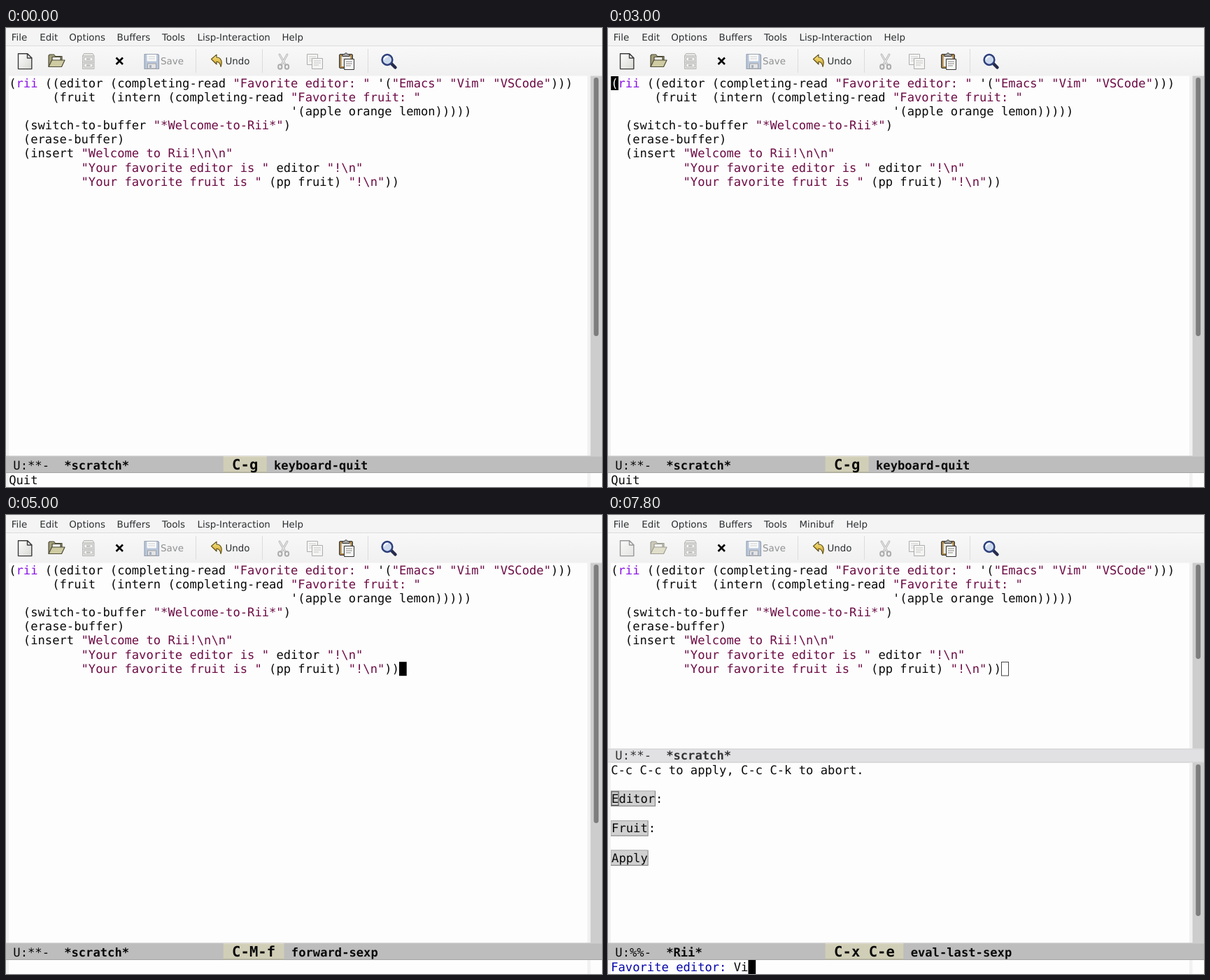
Write an HTML page that moves like this. It is 852 px wide and 657 px high and loops after 8000 ms.

```html
<!DOCTYPE html>
<html lang="en">
<head>
<meta charset="utf-8">
<title>Editor session</title>
<style>
  html, body { margin: 0; width: 100%; height: 100%; overflow: hidden; background: #fdfdfd; }
  svg { display: block; width: 852px; height: 657px; }
  text { white-space: pre; text-rendering: geometricPrecision; font: 17.16px "DejaVu Sans Mono", monospace; fill: #0a0a0a; }
  .ui { font: 13.43px "DejaVu Sans", sans-serif; fill: #2c2f31; }
  .bold { font-weight: bold; }
  .key { font-size: 20.6px; font-weight: bold; }
  .string { fill: #6d0c45; }
  .keyword { fill: #8a14e6; }
  .prompt { fill: #0606ac; }
  .soft { fill: #333; }
  .off { opacity: .5; }
</style>
</head>
<body>
<svg id="stage" viewBox="0 0 852 657" xml:space="preserve">
  <defs>
    <linearGradient id="bar" x2="0" y2="1"><stop stop-color="#f8f8f8"/><stop offset="1" stop-color="#f0f0f0"/></linearGradient>
    <linearGradient id="paper" x2="1" y2="1"><stop stop-color="#fff"/><stop offset="1" stop-color="#d6d6d2"/></linearGradient>
    <linearGradient id="gold" x2="0" y2="1"><stop stop-color="#fbe98a"/><stop offset="1" stop-color="#c99a1c"/></linearGradient>

    <g id="new" stroke="#3c3c3c" stroke-width="1.4" stroke-linejoin="round">
      <path d="M17.5 36.7H30.5L36.8 43V58.6H17.5Z" fill="url(#paper)"/>
      <path d="M30.5 36.7V43H36.8Z" fill="#fff"/>
    </g>
    <g id="open" stroke="#4b4a36" stroke-width="1.2" stroke-linejoin="round">
      <path d="M61 55.5V39.5L62.5 38H68.5L70.5 40.5H80V46" fill="#a5a17c"/>
      <path d="M66 41.5H78V49H66Z" fill="#f2f2ee"/>
      <path d="M61 55.5L65.5 46H84L79.5 55.5Z" fill="#cfcba2"/>
    </g>
    <g id="cabinet" stroke="#777" fill="#d9d9d2" stroke-linejoin="round">
      <path d="M109.5 40L111.5 36.5H124L126 40V58.5H109.5Z"/>
      <path d="M109.5 40H126M109.5 49H126M111.5 42H124V47H111.5ZM111.5 51H124V56H111.5Z" fill="#f2f2ec"/>
      <path d="M115 44.5H120.5M115 53.5H120.5" stroke-width="1.8"/>
    </g>
    <g id="save" stroke-linejoin="round">
      <path d="M198 37.5H217L218.5 39V58.5H198Z" fill="#7f9ac2" stroke="#3c5070" stroke-width="1.2"/>
      <path d="M201.500 38H215V47.500H201.500Z" fill="#fff"/>
      <path d="M203.500 41H213M203.500 44H213" stroke="#aaa"/>
      <path d="M202.500 51H214.500V58H202.500Z" fill="#d6d6d6" stroke="#555"/>
      <path d="M205 53H208V57H205Z" fill="#556f94"/>
    </g>
    <path id="undo" d="M293.5 44.500L301 38.200V42C307 42 310 47.500 307 55.500C306.200 50.800 304.500 48.300 301 48.300V52Z" fill="url(#gold)" stroke="#5c4b14" stroke-width="1.1" stroke-linejoin="round"/>
    <g id="cut" fill="none" stroke="#666" stroke-linecap="round">
      <path d="M391 38L399.500 53M402 38L393.500 53" stroke="#6d6d6d" stroke-width="2.8"/>
      <path d="M391 38L399.500 53M402 38L393.500 53" stroke="#e6e6e6" stroke-width="1.2"/>
      <ellipse cx="391.8" cy="55.500" rx="2.700" ry="3.300" stroke-width="2"/>
      <ellipse cx="401.500" cy="55.500" rx="2.700" ry="3.300" stroke-width="2"/>
    </g>
    <g id="copy" stroke="#666" fill="#f6f6f4">
      <path d="M430.500 37.500H445.500V52.500H430.500Z"/>
      <path d="M433 41H443M433 44H443M433 47H443" stroke="#aaa"/>
      <path d="M437.500 43.500H452.500V58.500H448L437.500 58.500Z"/>
      <path d="M440 47H450M440 50H450M440 53H447" stroke="#999"/>
    </g>
    <g id="paste" stroke="#333" stroke-linejoin="round">
      <rect x="476.500" y="37.500" width="19" height="20" rx="1.500" fill="#a58247"/>
      <path d="M479.500 40.500H492.500V55H479.500Z" fill="#e9e9e4" stroke="none"/>
      <path d="M481 40.500V37.500H484C484 35.300 488 35.300 488 37.500H491V40.500Z" fill="#aaa"/>
      <path d="M483.500 44.500H497.500V59.500H483.500Z" fill="#f8f8f6"/>
      <path d="M486 48H495M486 51H495M486 54H493" stroke="#888"/>
    </g>
    <g id="find">
      <path d="M551 51L556.500 56.500" stroke="#252b4a" stroke-width="4.500" stroke-linecap="round"/>
      <circle cx="545" cy="45.500" r="7.400" fill="#ccd9ec" stroke="#2d3f7c" stroke-width="2.500"/>
      <path d="M540.500 45C541 42 543 40.700 546 40.700" fill="none" stroke="#fff" stroke-width="1.800"/>
    </g>
  </defs>
  <g id="view"></g>
</svg>
<script>
const LOOP = 8000, CELL = 10.33, ROW = 20.17, LEFT = 4.2;

// [start ms, phase, cursor visible, typed text]
const STEPS = [
  [0, 'quit', 0], [200, 'quit', 1], [600, 'quit', 0], [1000, 'quit', 1],
  [1600, 'quit', 0], [2000, 'quit', 1], [2600, 'quit', 0], [3000, 'quit', 1], [3600, 'quit', 0],
  [3800, 'forward', 1], [4400, 'forward', 0], [4800, 'forward', 1],
  [5200, 'ask', 1, ''], [5800, 'ask', 0, ''], [6200, 'ask', 1, ''], [6800, 'ask', 0, ''],
  [7200, 'ask', 1, ''], [7400, 'ask', 1, 'V'], [7600, 'ask', 1, 'Vi']
];
const COMMANDS = {
  quit: ['C-g', 'keyboard-quit'],
  forward: ['C-M-f', 'forward-sexp'],
  ask: ['C-x C-e', 'eval-last-sexp']
};
const CODE = String.raw`(rii ((editor (completing-read "Favorite editor: " '("Emacs" "Vim" "VSCode")))
      (fruit  (intern (completing-read "Favorite fruit: "
                                       '(apple orange lemon)))))
  (switch-to-buffer "*Welcome-to-Rii*")
  (erase-buffer)
  (insert "Welcome to Rii!\n\n"
          "Your favorite editor is " editor "!\n"
          "Your favorite fruit is " (pp fruit) "!\n"))`.split('\n');

const rect = (x, y, w, h, fill, extra = '') =>
  `<rect x="${x}" y="${y}" width="${w}" height="${h}" fill="${fill}" ${extra}/>`;
const text = (x, y, str, cls = '') => `<text x="${x}" y="${y}" class="${cls}">${str}</text>`;
const span = (cls, str) => `<tspan class="${cls}">${str}</tspan>`;
const icon = (name, enabled) => `<use href="#${name}" class="${enabled ? '' : 'off'}"/>`;
const cursor = (x, y) => rect(x, y, CELL + .4, 20, '#000');
const hollow = (x, y) => rect(x, y, CELL - .3, 19.5, 'none', 'stroke="#444"');

const highlight = line => line
  .replace(/"[^"]*"/g, s => span('string', s))
  .replace(/^\(rii/, '(' + span('keyword', 'rii'));

function menu(asking) {
  const items = [[7.8, 'File'], [48.3, 'Edit'], [90.3, 'Options'], [158.6, 'Buffers'], [223, 'Tools'],
    [273.5, asking ? 'Minibuf' : 'Lisp-Interaction'], [asking ? 340.5 : 394.5, 'Help']];
  return rect(0, 0, 852, 26, '#f4f4f4') + rect(0, 25, 852, 1, '#dcdcdc') +
    items.map(([x, label]) => text(x, 17.5, label, 'ui')).join('');
}

function toolbar(asking, canUndo) {
  return rect(0, 26, 852, 42.5, 'url(#bar)') +
    [271, 366, 517].map(x => rect(x, 30, 1, 34, '#dcdcdc')).join('') +
    icon('new', !asking) + icon('open', !asking) + icon('cabinet', false) +
    '<path d="M157.500 42.500L167 52M167 42.500L157.500 52" stroke="#0a0a0a" stroke-width="2.700"/>' +
    icon('save', false) + text(221, 52, 'Save', 'ui off') +
    icon('undo', canUndo) + text(313.5, 52, 'Undo', canUndo ? 'ui' : 'ui off') +
    icon('cut', false) + icon('copy', false) + icon('paste', true) + icon('find', true);
}

const pane = (top, bottom, thumbEnd) =>
  rect(0, top, 4, bottom - top, '#f1f1f1') + rect(831, top, 4.5, bottom - top, '#f1f1f1') +
  rect(835.5, top, 16.5, bottom - top, '#cdcdcd') +
  rect(840.3, top + 2.5, 6.8, thumbEnd - top - 2.5, '#7d7d7d', 'rx="3.4"');

function modeLine(flags, buffer, [key, command]) {
  const keyWidth = (key.length + 2) * 12.4;
  return rect(0, 612.5, 852, 24, '#bdbdbd') + rect(0, 612.5, 852, 1, '#cbcbcb') + rect(0, 636, 852, 1, '#a4a4a4') +
    text(CELL, 631.5, flags) + text(8 * CELL + .5, 631.5, buffer, 'bold') +
    rect(310.7, 613, keyWidth, 23.5, '#d1ceb7') +
    rect(310.7, 613, keyWidth, 1, '#e2dfcb') + rect(310.7, 635.5, keyWidth, 1, '#a19f8d') +
    text(323.1, 631.5, key, 'key') + text(310.7 + keyWidth + CELL, 631.5, command, 'bold');
}

function button(label, y, after) {
  const w = label.length * CELL + 2;
  return rect(4, y, w, 22.5, '#858585') + rect(4, y, w - 1, 21.5, '#b5b5b5') +
    rect(5, y + 1, w - 2.3, 20, '#d0d0d0') + text(5.1, y + 17.2, label) + text(w + 4, y + 17.2, after);
}

const form = () =>
  rect(0, 334.5, 852, 20, '#e1e1e4') + rect(0, 334.5, 852, 1, '#d2d2d4') + rect(0, 353.5, 852, 1, '#cbcbcd') +
  text(CELL, 350.3, 'U:**-', 'soft') + text(8 * CELL + .5, 350.3, '*scratch*', 'bold soft') +
  pane(354.5, 612.5, 574) +
  text(LEFT, 370.5, 'C-c C-c to apply, C-c C-k to abort.') +
  button('Editor', 394.7, ':') + button('Fruit', 437.2, ':') + button('Apply', 479.6, '') +
  hollow(5, 396);

function draw([, phase, blink, typed]) {
  const asking = phase === 'ask';
  const end = [LEFT + 54 * CELL, 69 + 7 * ROW];
  let out = rect(0, 0, 852, 657, '#fdfdfd') + menu(asking) + toolbar(asking, !asking || typed !== '');
  out += asking ? pane(68.5, 334.5, 206) : pane(68.5, 612.5, 441);
  out += CODE.map((line, i) => text(LEFT, 84.5 + i * ROW, highlight(line))).join('');
  if (phase === 'quit' && blink)
    out += cursor(LEFT, 69) + `<text x="${LEFT}" y="84.5" style="fill:#fdfdfd">(</text>`;
  if (phase === 'forward' && blink) out += cursor(...end);
  if (asking) out += hollow(end[0] + .5, end[1] + .3) + form();
  out += modeLine(asking ? 'U:%%-' : 'U:**-', asking ? '*Rii*' : '*scratch*', COMMANDS[phase]);
  out += rect(0, 637, 4, 20, '#f1f1f1') + rect(831, 637, 4.5, 20, '#f1f1f1');
  if (phase === 'quit') out += text(LEFT, 652.8, 'Quit');
  if (asking) {
    out += text(LEFT, 652.8, span('prompt', 'Favorite editor: ') + typed);
    if (blink) out += cursor(LEFT + (17 + typed.length) * CELL, 637);
  }
  return out;
}

const view = document.getElementById('view');
const start = performance.now();
let shown;
function tick() {
  const t = (performance.now() - start) % LOOP;
  const step = STEPS.findLast(([at]) => at <= t);
  if (step !== shown) view.innerHTML = draw(shown = step);
  requestAnimationFrame(tick);
}
tick();
</script>
</body>
</html>
```
